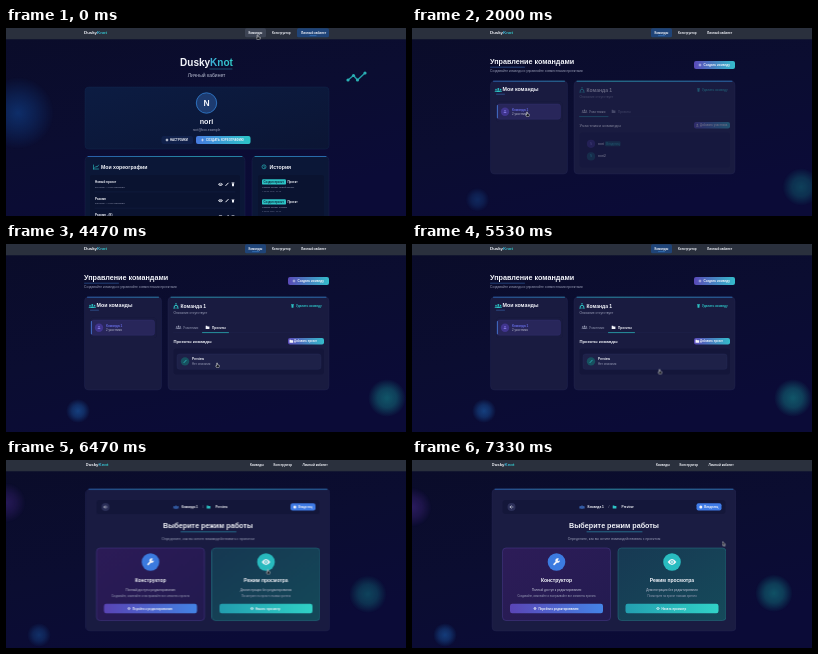
These frames come from a looping animation (400 px wide and 188 px high, 7400 ms). An HTML page:

```html
<!DOCTYPE html>
<html lang="ru">
<head>
<meta charset="utf-8">
<title>Личный кабинет</title>
<style>
html, body { margin: 0; width: 100%; height: 100%; overflow: hidden; background: #0a0c2c; }
svg { display: block; width: 100vw; height: 100vh; }
text { font-family: "Liberation Sans", Arial, sans-serif; }
.b { font-weight: 700; }
.m { text-anchor: middle; }
.a { animation: 7.4s linear infinite both; }

#profile, #pillHome { animation-name: profile; }
@keyframes profile { 0%, 5.4% { opacity: 1 } 5.41%, 100% { opacity: 0 } }
#teams { animation-name: teams; }
@keyframes teams {
  0%, 5.4% { opacity: 0; transform: translateY(4px); animation-timing-function: ease }
  10.8%, 81% { opacity: 1; transform: none }
  81.01%, 100% { opacity: 0; transform: none }
}
#pillTeams { animation-name: pillTeams; }
@keyframes pillTeams { 0%, 5.4% { opacity: 0 } 5.41%, 81% { opacity: 1 } 81.01%, 100% { opacity: 0 } }
#empty { animation-name: empty; }
@keyframes empty { 0%, 26% { opacity: 1 } 26.01%, 100% { opacity: 0 } }
#detail { animation-name: detail; }
@keyframes detail { 0%, 26% { opacity: 0 } 29%, 100% { opacity: 1 } }
#picked { animation-name: picked; }
@keyframes picked { 0%, 23% { opacity: 0 } 26%, 100% { opacity: 1 } }
.grow { animation-name: grow; }
@keyframes grow { 0%, 26% { height: 79px } 26.01%, 100% { height: 93px } }
#members { animation-name: members; }
@keyframes members { 0%, 42.3% { opacity: 1 } 42.31%, 100% { opacity: 0 } }
#projects { animation-name: projects; }
@keyframes projects { 0%, 42.3% { opacity: 0 } 44.5%, 100% { opacity: 1 } }
#mode { animation-name: mode; }
@keyframes mode {
  0%, 81.9% { opacity: 0; transform: translateY(4px); animation-timing-function: ease }
  88%, 100% { opacity: 1; transform: none }
}
.shift { animation-name: shift; }
@keyframes shift {
  0%, 81% { transform: none } 81.01%, 88.4% { transform: translateX(1.5px) }
  88.41%, 96.4% { transform: none } 96.41%, 100% { transform: translateX(1.5px) }
}
#hover { animation-name: hover; }
@keyframes hover { 0%, 88.4% { opacity: 0 } 91%, 96.4% { opacity: 1 } 98.9%, 100% { opacity: 0 } }
#lift { animation-name: lift; }
@keyframes lift { 0%, 88.4% { transform: none } 91%, 96.4% { transform: translateY(-.8px) } 98.9%, 100% { transform: none } }

#tealBlob { animation-name: tealBlob; }
@keyframes tealBlob {
  0%, 5.4% { opacity: 0; transform: translate(400px, 165px) }
  12.57% { opacity: .35; transform: translate(399px, 163px) }
  37.84% { opacity: 1; transform: translate(382px, 156px) }
  60.4%, 81% { opacity: 1; transform: translate(381px, 154px) }
  81.01% { opacity: 1; transform: translate(363px, 133px) }
  91.9% { opacity: .6; transform: translate(361px, 135px) }
  100% { opacity: 1; transform: translate(362px, 133px) }
}
#blueBlob { animation-name: blueBlob; }
@keyframes blueBlob {
  0%, 12.57% { opacity: 0; transform: translate(62px, 174px) }
  37.84% { opacity: 1; transform: translate(68px, 170px) }
  60.4%, 81% { opacity: 1; transform: translate(72px, 167px) }
  81.01% { opacity: 1; transform: translate(33px, 175px) }
  91.9% { opacity: .5; transform: translate(33px, 175px) }
  100% { opacity: 1; transform: translate(33px, 175px) }
}
#violetBlob { animation-name: violetBlob; }
@keyframes violetBlob {
  0%, 81% { opacity: 0; transform: translateY(45px) }
  81.01% { opacity: 1; transform: translateY(45px) }
  91.9% { opacity: .7; transform: translateY(41px) }
  100% { opacity: 1; transform: translateY(48px) }
}
#cursor { animation-name: cursor; animation-timing-function: ease-in-out; }
@keyframes cursor {
  0%, 5.4% { transform: translate(251.5px, 7px) }
  12.57% { transform: translate(211.5px, 33px) }
  23.6%, 27% { transform: translate(115px, 84px) }
  37.84% { transform: translate(210px, 91.5px) }
  41.2%, 43.2% { transform: translate(209px, 83.5px) }
  60.4% { transform: translate(211px, 119px) }
  71.6%, 82.84% { transform: translate(247.5px, 125.5px) }
  91.9% { transform: translate(275px, 94.5px) }
  96.3%, 100% { transform: translate(310.5px, 81.5px) }
}
#hand { animation-name: hand; }
#arrow { animation-name: arrow; }
@keyframes hand {
  0%, 5.8% { opacity: 1 } 5.81%, 22% { opacity: 0 } 22.01%, 28% { opacity: 1 }
  28.01%, 40% { opacity: 0 } 40.01%, 45% { opacity: 1 } 45.01%, 56% { opacity: 0 }
  56.01%, 96.3% { opacity: 1 } 96.31%, 100% { opacity: 0 }
}
@keyframes arrow {
  0%, 5.8% { opacity: 0 } 5.81%, 22% { opacity: 1 } 22.01%, 28% { opacity: 0 }
  28.01%, 40% { opacity: 1 } 40.01%, 45% { opacity: 0 } 45.01%, 56% { opacity: 1 }
  56.01%, 96.3% { opacity: 0 } 96.31%, 100% { opacity: 1 }
}
</style>
</head>
<body>
<svg id="stage" viewBox="0 0 400 188" preserveAspectRatio="none"></svg>
<script>
const WHITE = '#f2f4fa', GREY = '#9a9fb8', TEAL = '#2cc2c4', VIOLET = '#4b3fa6';

const text = (x, y, s, size, fill = WHITE, cls = '') =>
  `<text x="${x}" y="${y}" font-size="${size}" fill="${fill}" class="${cls}">${s}</text>`;
const bold = (x, y, s, size, fill) => text(x, y, s, size, fill, 'b');
const mid = (x, y, s, size, fill = GREY) => text(x, y, s, size, fill, 'm');
const title = (x, y, s, size, fill) => text(x, y, s, size, fill, 'b m');
const box = (x, y, w, h, r, fill, more = '') =>
  `<rect x="${x}" y="${y}" width="${w}" height="${h}" rx="${r}" fill="${fill}" ${more}/>`;
const dot = (x, y, r, fill, more = '') => `<circle cx="${x}" cy="${y}" r="${r}" fill="${fill}" ${more}/>`;
const line = (d, stroke, w = .6) =>
  `<path d="${d}" fill="none" stroke="${stroke}" stroke-width="${w}" stroke-linecap="round" stroke-linejoin="round"/>`;
const group = (id, body, cls = 'a') => `<g id="${id}" class="${cls}">${body}</g>`;
const place = (x, y, k, body) => `<g transform="translate(${x} ${y}) scale(${k})">${body}</g>`;
const linear = (id, from, to, y2 = 0) =>
  `<linearGradient id="${id}" x2="1" y2="${y2}"><stop stop-color="${from}"/><stop offset="1" stop-color="${to}"/></linearGradient>`;
const glow = (id, color, mid) =>
  `<radialGradient id="${id}"><stop stop-color="${color}" stop-opacity=".85"/><stop offset=".5" stop-color="${color}" stop-opacity="${mid}"/><stop offset="1" stop-color="${color}" stop-opacity="0"/></radialGradient>`;

// Icons, drawn around their centre
const person = (x, y, k, c) => place(x, y, k, dot(0, -1, 1, c) + `<path d="M-1.8 2Q-1.8.3 0 .3T1.8 2Z" fill="${c}"/>`);
const people = (x, y, k, c) => person(x - 2.3 * k, y + .2 * k, k * .75, c) + person(x + 2.3 * k, y + .2 * k, k * .75, c) + person(x, y, k, c);
const plus = (x, y) => line(`M${x - 1} ${y}h2m-1-1v2`, WHITE, .55);
const eye = (x, y, k, hole) => place(x, y, k,
  `<path d="M-2.2 0Q0-3 2.2 0Q0 3-2.2 0Z" fill="${WHITE}"/>` + dot(0, 0, .9, hole) + dot(0, 0, .45, WHITE));
const bin = (x, y, c) => `<path d="M${x - 1.4} ${y - 1.7}h2.8v.7h-2.8zM${x - 1.1} ${y - .7}h2.2l-.2 2.6h-1.8z" fill="${c}"/>`;
const pencil = (x, y) => line(`M${x - 1.2} ${y + 1.3}L${x + 1.2} ${y - 1.2}`, WHITE, 1);
const folder = (x, y, c) => `<path d="M${x - 1.8} ${y - 1.5}h1.4l.5.6h1.8v2.5h-3.7z" fill="${c}"/>`;
const gear = (x, y) => dot(x, y, .9, 'none', `stroke="${WHITE}" stroke-width=".9"`);
const wrench = (x, y) => place(x, y, 1,
  line('M-2.4 2.4L.8-.8', WHITE, 1.7) + `<path d="M2.6-3.2A2.3 2.3 0 1 0 3.4-1.6L1.6-1 .9-1.8Z" fill="${WHITE}"/>`);

const panel = (x, y, w, h, fill, cls = '') =>
  box(x, y, w, h, 4, fill, `class="${cls}" stroke="#2a2f5c" stroke-width=".3"`) + line(`M${x + 3} ${y + .2}h${w - 6}.01`, 'url(#edge)', .8);
const pill = (x, w) => box(x, .3, w, 9, 1.6, '#1f4478') + line(`M${x + w / 2 - 3} 7.6h6`, '#3f8ee0', .5);
const logo = (y, size, cls, x) =>
  `<text x="${x}" y="${y}" font-size="${size}" class="b ${cls}" fill="${WHITE}">Dusky<tspan fill="url(#brand)">Knot</tspan></text>`;

const defs = `<defs>
  <linearGradient id="sky" x2=".5" y2="1"><stop stop-color="#0a0c29"/><stop offset=".55" stop-color="#0b0d31"/><stop offset="1" stop-color="#0b0b37"/></linearGradient>
  <linearGradient id="edge" gradientUnits="userSpaceOnUse" x1="78" x2="323"><stop stop-color="#2f6fc4"/><stop offset=".5" stop-color="#2aa5b8"/><stop offset="1" stop-color="#2f7cc8"/></linearGradient>
  ${linear('brand', '#4a86e8', '#30cfc9')}${linear('cta', '#5a49b8', '#34bccb')}${linear('blueCta', '#477be0', '#2bc6c8')}
  ${linear('work', '#5a45b6', '#4484e6')}${linear('view', '#239fb0', '#31d3c8')}${linear('on', '#1fa5b2', '#2bcdc8', 1)}
  ${linear('plum', '#2d1c58', '#231b50', 1)}${linear('deep', '#173953', '#154a5a', 1)}${linear('hero', '#0c1c42', '#0b1534', 1)}
  ${glow('gTeal', '#126372', .6)}${glow('gBlue', '#17498c', .55)}${glow('gViolet', '#34206c', .5)}${glow('gHome', '#0f3474', .45)}
</defs>`;

const back = box(0, 0, 400, 188, 0, 'url(#sky)')
  + group('tealBlob', dot(0, 0, 19, 'url(#gTeal)'))
  + group('blueBlob', dot(0, 0, 12, 'url(#gBlue)'))
  + group('violetBlob', dot(0, 0, 20, 'url(#gViolet)'));

const nav = box(0, 0, 400, 11.3, 0, '#2a303d') + `<g class="a shift">`
  + group('pillHome', box(239, .3, 21, 9, 1.6, '#3d4454') + pill(291, 32))
  + group('pillTeams', pill(239, 21))
  + logo(6.2, 4.35, '', 78)
  + bold(242.5, 5.6, 'Команды', 3, WHITE) + bold(266, 5.6, 'Конструктор', 3, WHITE)
  + bold(295, 5.6, 'Личный кабинет', 3.1, WHITE) + '</g>';

const choreo = (y, name, note) => bold(89, y, name, 3, WHITE) + text(89, y + 4.2, note, 2.5, GREY)
  + eye(214.5, y + 1, 1.1, '#0c1434') + pencil(221, y + 1) + bin(227, y + 1, WHITE)
  + line(`M89 ${y + 8.6}h140`, '#1d2a52', .3);
const event = (y, note, date) => box(256, y - 3.8, 24, 5.4, 1.2, TEAL) + bold(257.5, y, 'Создан проект', 2.8, '#0b2c40')
  + bold(281.5, y, 'Проект', 2.9, WHITE) + text(256, y + 5, note, 2.4, GREY) + text(256, y + 9, date, 2.2, '#6b7190');

const profile = group('profile',
  dot(12, 85, 36, 'url(#gHome)')
  + logo(38, 10, 'm', 200.5) + line('M204 41h22', '#277b9c', .6)
  + mid(200.5, 49, 'Личный кабинет', 5, '#b9bed2')
  + line('M342 52L347.5 47.5L351.5 52L359 45', '#249ba5', 1.5)
  + [[342, 52], [347.5, 47.5], [351.5, 52], [359, 45]].map(p => dot(...p, 1.6, '#2ab0b4')).join('')
  + box(79, 59, 244, 62, 3.5, 'url(#hero)', 'stroke="#173058" stroke-width=".3"')
  + dot(200.5, 75, 10.2, '#1d3b70', 'stroke="#2f78c8" stroke-width=".9"')
  + title(200.5, 78, 'N', 8.5) + title(200.5, 96, 'nori', 7.2) + mid(200.5, 103.2, 'nori@box.example', 3.3)
  + box(155.5, 108, 31.5, 8, 2, '#10204a') + gear(161, 112) + bold(164, 113, 'НАСТРОЙКИ', 2.9, WHITE)
  + box(190, 108, 54.5, 8, 2, 'url(#blueCta)') + plus(196.5, 112) + bold(200, 113, 'СОЗДАТЬ ХОРЕОГРАФИЮ', 2.9, WHITE)
  + panel(79, 128.3, 160, 70, '#0b1737') + line('M87.5 141V137M87.5 141h5M88.5 140l1.5-1.7 1 .8 1.6-2', TEAL, .6)
  + bold(95, 140.6, 'Мои хореографии', 5.2, WHITE) + box(84, 147, 150, 50, 2, '#0a1330')
  + choreo(155.3, 'Новый проект', '8/7/2025 — Нет описания')
  + choreo(171.6, 'Разомн', '6/6/2025 — Нет описания')
  + choreo(187.6, 'Разомн - (К)', '')
  + panel(246, 128.3, 77, 70, '#0b1737') + dot(258, 138.8, 2, 'none', `stroke="${TEAL}" stroke-width=".6"`) + line('M258 137.8v1.2l.8.5', TEAL, .5)
  + bold(263.5, 140.6, 'История', 5.2, WHITE) + box(252, 147, 66, 50, 2, '#0a1330')
  + event(155, 'Создан проект Новый проект', '7 июля 2025, 21:48')
  + event(175, 'Создан проект Разомн', '6 июня 2025, 20:12'));

const create = (x, y, w, h) => box(x, y, w, h, 2, 'url(#cta)') + plus(x + 6, y + h / 2)
  + bold(x + 9.5, y + h / 2 + 1, 'Создать команду', w > 38 ? 3.1 : 2.9, WHITE);
const tabs = (memberOn) => {
  const [a, b] = memberOn ? [WHITE, GREY] : [GREY, WHITE];
  return people(172.5, 83.2, .8, a) + text(177, 84.5, 'Участники', 3.2, a, memberOn ? 'b' : '')
    + folder(201.5, 83.3, b) + text(206, 84.5, 'Проекты', 3.2, b, memberOn ? '' : 'b')
    + line(memberOn ? 'M167.5 88.6h28.5' : 'M196.5 88.6h26', TEAL, .7);
};
const add = (label, icon) => box(282, 94, 36, 6.6, 2, 'url(#cta)') + icon + bold(288, 98.3, label, 2.7, WHITE);
const member = (y, name, fill, mark) => dot(179, y, 4.1, fill) + mid(179, y + 1, 'N', 3, mark) + bold(186, y + 1, name, 3.2, WHITE);

const teams = group('teams',
  bold(78, 36, 'Управление командами', 7.2, WHITE) + line('M78.5 39.2h34', '#3b77c4', .5)
  + text(78, 43.6, 'Создавайте команды и управляйте совместными проектами', 3.3, GREY)
  + create(282, 33, 41, 8)
  + panel(78.5, 53, 77, 79, '#191b40', 'a grow') + people(86.3, 62, 1, TEAL)
  + bold(90.5, 63.3, 'Мои команды', 5.3, WHITE) + line('M84.5 66.2h8', '#3b77c4', .5)
  + box(84.5, 73.5, 66, 20.5, 3, '#14163a')
  + dot(93, 83.7, 4.2, '#32297a') + person(93, 83.5, .8, '#6d62cf')
  + bold(100, 82.6, 'Команда 1', 3.2, WHITE) + text(100, 87, '2 участника', 2.9, GREY)
  + group('picked', box(84.5, 73.5, 66, 20.5, 3, '#191b40') + box(85, 76, 63.5, 15.3, 2.5, '#28265a', 'stroke="#38357a" stroke-width=".3"')
    + line('M85.4 77.5v12.3', '#477fe0', .8) + dot(93, 83.7, 4.2, '#40358e') + person(93, 83.5, .8, '#7b70da')
    + bold(100, 82.6, 'Команда 1', 3.2, '#646ae0') + text(100, 87, '2 участника', 2.9, '#b6b9cc'))
  + panel(162, 53, 161, 79, '#191b40', 'a grow')
  + group('empty', people(242.5, 75.5, 2.3, VIOLET) + title(242.5, 94, 'Выберите команду', 5.2)
    + mid(242.5, 102.2, 'Выберите команду из списка слева или создайте новую', 3.25) + create(225, 110.5, 35, 7.8))
  + group('detail', person(170, 60.5, .7, TEAL) + person(168.4, 63, .7, TEAL) + person(171.6, 63, .7, TEAL)
    + bold(174.5, 63.7, 'Команда 1', 5, WHITE) + text(167.5, 70.3, 'Описание отсутствует', 3.3, GREY)
    + bin(286.5, 61.8, TEAL) + bold(290, 62.9, 'Удалить команду', 3, TEAL)
    + line('M167.5 88.8h150', '#2a2d58', .3)
    + group('members', tabs(true) + bold(167.5, 98.8, 'Участники команды', 4.2, WHITE)
      + add('Добавить участника', person(285.3, 97.2, .7, WHITE))
      + box(167.5, 104.5, 150.5, 35, 3, '#14163a')
      + member(115.8, 'nori', '#382d80', '#8d84e0') + box(193, 113.2, 15.5, 5, 1.2, '#13505e') + text(194.3, 116.8, 'Владелец', 2.9, TEAL)
      + member(128.4, 'nori2', '#135061', TEAL))
    + group('projects', tabs(false) + bold(167.5, 98.8, 'Проекты команды', 4.2, WHITE)
      + add('Добавить проект', folder(285.3, 97.2, WHITE))
      + box(167.5, 104.5, 150.5, 26, 3, '#14163a') + box(171, 110, 144, 15.3, 2.5, '#1e2148', 'stroke="#2b3060" stroke-width=".3"')
      + dot(179, 117.4, 4.2, '#17505f') + line('M178 118.6l2.2-2.4', TEAL, .8)
      + bold(186, 116.4, 'Preview', 3.2, WHITE) + text(186, 121.4, 'Нет описания', 2.9, GREY))));

const viewText = (a, b) => title(258.5, 122.3, 'Режим просмотра', 5) + mid(258.5, 131, 'Демонстрация без редактирования', 3.15, a)
  + mid(258.5, 137, 'Посмотрите на проект глазами зрителя', 2.7, b);
const viewButton = (fill) => box(212, 143.8, 93, 9.4, 2.2, fill) + eye(244.5, 148.5, .8, '#2bb9bf') + bold(248, 149.5, 'Начать просмотр', 2.9, WHITE);

const mode = group('mode', '<g class="a shift">'
  + panel(78.5, 29, 244, 142, '#1a1c42')
  + box(89, 40, 223, 14, 3, '#14173a') + dot(98, 47, 4, '#2b2f58') + line('M99.5 47h-3m1.3-1.3l-1.3 1.3 1.3 1.3', WHITE, .5)
  + people(168.5, 47, .8, '#4580dc') + bold(174, 48.1, 'Команда 1', 3.2, WHITE) + text(195, 48.1, '/', 3.2, GREY)
  + folder(201, 47, TEAL) + bold(208, 48.1, 'Preview', 3.2, WHITE)
  + box(283, 43.3, 25, 7.2, 2, '#3f7be6') + dot(287.3, 46.9, 1.5, WHITE) + bold(290.7, 48, 'Владелец', 2.9, WHITE)
  + title(200.5, 68.4, 'Выберите режим работы', 7.2) + line('M173.5 71.8h55', 'url(#edge)', .6)
  + mid(200.5, 79.6, 'Определите, как вы хотите взаимодействовать с проектом', 3.4)
  + box(89, 88, 108, 72.5, 3.5, 'url(#plum)', 'stroke="#493a8c" stroke-width=".5"')
  + dot(143, 102, 8.8, '#3c7be0') + wrench(143, 102) + title(143, 122.3, 'Конструктор', 5)
  + mid(143, 131, 'Полный доступ к редактированию', 3.15, '#c2c4d6')
  + mid(143, 137, 'Создавайте, изменяйте и настраивайте все элементы проекта', 2.7)
  + box(96.5, 143.8, 93, 9.4, 2.2, 'url(#work)') + gear(121.5, 148.5) + bold(125, 149.5, 'Перейти к редактированию', 2.95, WHITE)
  + group('lift', box(204.5, 88, 108, 72.5, 3.5, 'url(#deep)', 'stroke="#247684" stroke-width=".5"')
    + dot(258.5, 102, 8.8, '#29bcc0') + eye(258.5, 102, 2, '#29bcc0') + viewText('#c2c4d6', GREY) + viewButton('url(#view)')
    + group('hover', box(204.3, 87.8, 108.4, 73, 3.5, 'url(#on)', 'stroke="#35d0d0" stroke-width=".5"')
      + dot(258.5, 102, 8.8, '#38c9c9') + eye(258.5, 102, 2, '#38c9c9')
      + viewText('#d4f2f2', '#9fe0e2') + viewButton('#2cbfc2'))) + '</g>');

const ink = 'fill="#10131c" stroke="#fff" stroke-width=".45" stroke-linejoin="round"';
const cursor = group('cursor',
  group('arrow', `<path d="M0 0V4.2L1 3.3L1.7 4.8L2.4 4.5L1.8 3.1H3Z" ${ink}/>`)
  + group('hand', `<path d="M-.4 0Q0-.5.5 0V1.7L2.3 2.2V3.6L1.8 4.7H-.3L-1.5 2.9L-1.1 2.5L-.4 3Z" ${ink}/>`));

document.getElementById('stage').innerHTML = defs + back + profile + teams + mode + nav + cursor;
</script>
</body>
</html>
```
